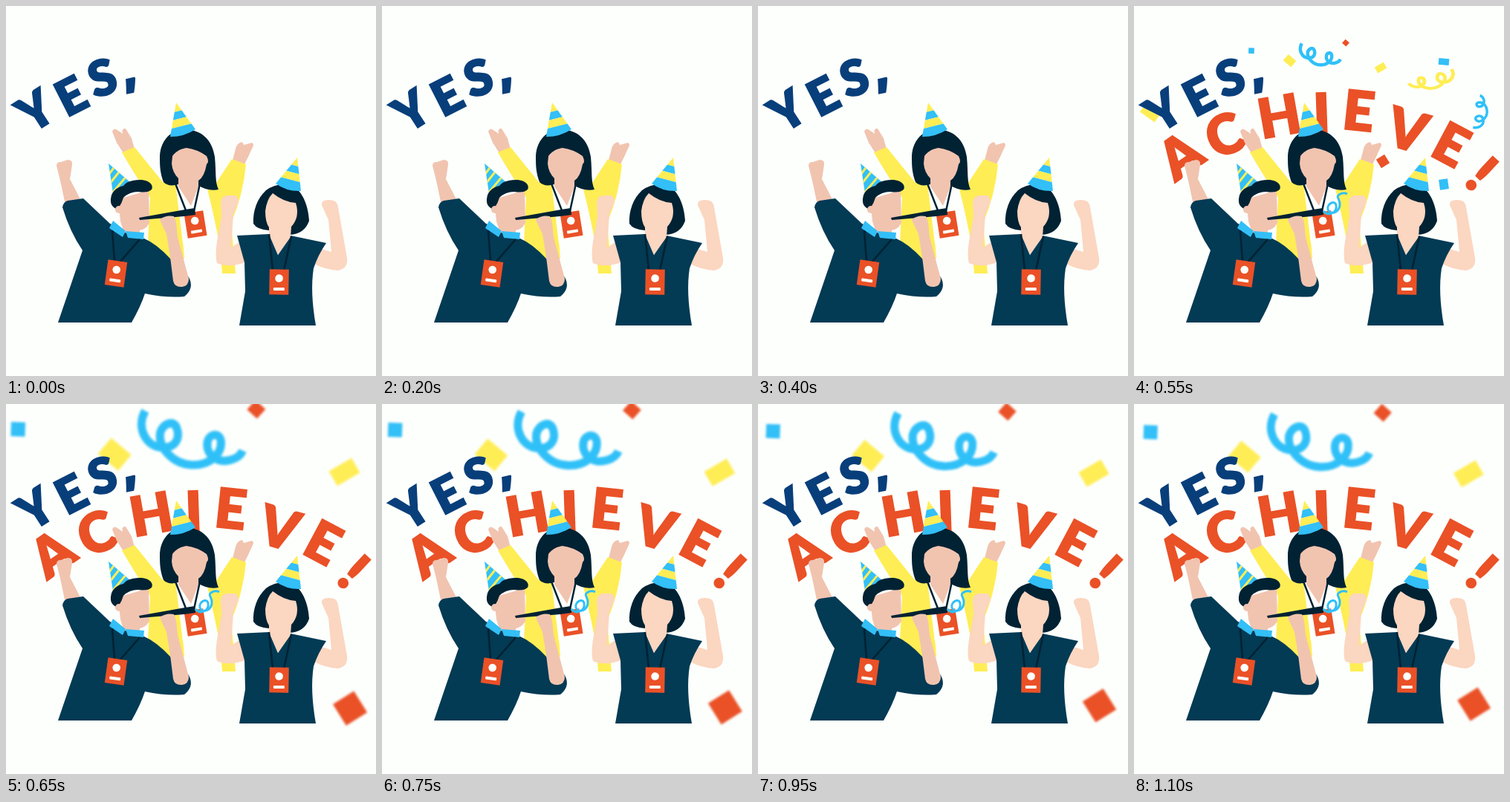
These frames come from a looping animation (498 by 498 pixels, 1150 ms). An HTML page:

```html
<!DOCTYPE html>
<html lang="en">
<head>
<meta charset="utf-8">
<title>Yes, achieve!</title>
<style>
html, body { margin: 0; width: 100%; height: 100%; overflow: hidden; background: #fdfffc; }
svg { display: block; width: 100%; height: 100%; }
text { font-family: Lato, Inter, sans-serif; font-weight: 900; text-anchor: middle; stroke-width: 1.6; }
#yes { fill: #083f7b; stroke: #083f7b; }
#yes text:last-child { font-family: "Open Sans", sans-serif; }
#achieve { stroke: #ea5127; }
.skin { fill: #f1c4b0; }
.fair { fill: #fbd6c0; }
.navy { fill: #033a54; }
.dark { fill: #002233; }
.yellow { fill: #ffed55; }
.cyan { fill: #33bff7; }
.orange { fill: #ea5127; }
.white { fill: #fdfffc; }
.cord { fill: none; stroke: #002233; stroke-width: 2.5; }
.curl { fill: none; stroke: #30c0f8; stroke-width: 11; }
.gold { stroke: #ffed55; }
</style>
</head>
<body>
<svg viewBox="0 0 498 498">
  <defs>
    <path id="curl" d="M-62-39C-75-16-60 9-40 10C-22 11-15-2-20-16C-24-28-38-22-42-10C-45 10-25 32 0 33C25 34 40 18 39 2C37-12 23-8 21 2C18 20 35 32 53 26Q64 23 68 14"/>
    <g id="badge">
      <rect class="orange" x="-13" y="-17" width="26" height="34"/>
      <circle class="white" cy="-5" r="5.3"/>
      <rect class="white" x="-7.5" y="7.5" width="15" height="4" rx="1"/>
    </g>
    <clipPath id="hatL"><path d="M138 212L144 252L168 238Z"/></clipPath>
    <clipPath id="hatM"><path d="M229 130L221 176Q240 176 255 166Z"/></clipPath>
    <clipPath id="hatR"><path d="M392 204L363 239Q378 250 397 249Z"/></clipPath>
  </defs>

  <g id="blur"><g id="confetti"></g></g>
  <g id="yes"></g>
  <g id="achieve" class="orange"></g>

  <!-- woman in yellow -->
  <path class="skin" d="M143 169Q145 163 150 167L157 172Q155 164 161 165L169 178L173 193L158 198L149 184Z"/>
  <path class="skin" d="M309 192Q311 184 318 183L320 187L331 184Q335 186 331 192L326 203L321 213L305 208Z"/>
  <path class="yellow" d="M156 197L173 190L211 237L232 240L240 340L190 340L194 258Q172 225 156 197Z"/>
  <path class="yellow" d="M304 206L323 213Q319 255 303 292L309 360H291Q288 310 270 244L283 238Z"/>
  <path class="white" d="M228 238H269Q280 285 287 320H238Z"/>
  <path class="dark" d="M236 167C259 164 277 177 281 203C283 224 281 236 286 247Q272 250 258 241L232 240Q219 244 212 237C208 226 207 218 207 205C207 182 220 169 236 167Z"/>
  <path class="skin" d="M224 202C229 195 236 192 243 191Q258 193 270 202Q274 210 270 213Q267 230 259 235V243L249 269L232 243V232Q224 224 223 212Z"/>
  <g clip-path="url(#hatM)"><g id="bandsM"></g></g>
  <path class="cord" d="M228 239L242 275M261 239L253 276"/>
  <use href="#badge" transform="translate(255 294) rotate(-9)"/>

  <!-- man with horn -->
  <g clip-path="url(#hatL)">
    <rect class="cyan" x="134" y="208" width="38" height="46"/>
    <path d="M137 229L147 215M139 240L158 216M143 252L168 222" stroke="#ffed55" stroke-width="3"/>
  </g>
  <path class="skin" d="M68 215Q68 210 74 210L83 207Q90 207 89 214L86 233L101 262L80 268L73 235Z"/>
  <path class="navy" d="M76 271Q77 264 83 262L104 259L140 293L184 312Q203 320 222 341L246 365Q254 380 240 391Q215 393 187 387Q181 405 169 426H70L103 329Q86 304 76 271Z"/>
  <path class="skin" d="M151 260L192 248L193 292Q189 300 180 302V307L159 305L154 290Z"/>
  <path class="dark" d="M141 264C140 251 148 244 158 242C163 235 173 234 183 234C194 235 199 242 196 247Q191 252 178 250Q166 250 158 258Q156 265 152 271L148 273Q142 270 141 264Z"/>
  <circle class="skin" cx="152" cy="274" r="5"/>
  <path class="cyan" d="M144 289L161 303L157 311L139 299ZM161 303L186 305L185 314L164 312Z"/>
  <path class="cord" d="M143 302L146 343M180 314L153 345"/>
  <use href="#badge" transform="translate(148 360) rotate(8)"/>
  <path class="skin" d="M207 288L212 279L226 280L229 292L231 311L246 367Q246 377 237 378Q227 379 225 370L221 338L216 307Z"/>
  <path class="dark" d="M179 285L241 274L254 272L255 281L240 283L180 288Z"/>
  <path class="skin" d="M209 286Q216 281 226 283L228 293L212 295Z"/>
  <path id="streamer" class="curl" style="stroke-width:3" d="M255 276C262 284 274 278 272 268C270 260 259 267 261 274C264 282 276 278 277 268C278 260 271 257 276 254Q281 250 287 253"/>

  <!-- woman on the right -->
  <path class="fair" d="M289 264Q290 255 299 255L309 255Q314 259 312 266L306 280L303 325L317 316L322 345Q300 353 284 346Q281 337 284 317L290 283Z"/>
  <path class="fair" d="M425 268Q424 261 434 261Q446 260 447 271L459 339Q461 353 447 356Q430 355 415 347L425 327L438 331L434 288Z"/>
  <path class="dark" d="M333 293C332 276 338 259 350 248Q365 237 385 241C400 250 407 270 408 289Q402 307 381 308L354 302Q338 301 333 293Z"/>
  <path class="navy" d="M311 309L354 307L366 335L383 309L431 319Q420 335 414 353Q409 385 417 430H314L322 384L321 345Z"/>
  <path class="fair" d="M349 276Q351 260 359 252Q374 264 390 265Q396 284 384 297L383 311L366 335L354 307V298Q349 291 349 276Z"/>
  <g clip-path="url(#hatR)"><g id="bandsR"></g></g>
  <path class="cord" d="M354 307L359 356M384 310L374 356"/>
  <use href="#badge" transform="translate(367.5 371.5) rotate(1)"/>
</svg>
<script>
const LOOP = 1150, STEP = 50, BURST = 550, CX = 251, CY = 77;
const $ = id => document.getElementById(id);

// Each glyph: character, centre x, centre y, tilt
function letters(id, size, list) {
  $(id).innerHTML = list.map(([ch, x, y, tilt]) =>
    `<text font-size="${size}" y="${size * .359}" transform="translate(${x} ${y}) rotate(${tilt})">${ch}</text>`).join('');
}

function bands(id, x, y, tilt, height) {
  const edges = [0, .27, .5, .74, 1.2];
  $(id).innerHTML = edges.slice(0, 4).map((e, i) =>
    `<rect class="${i % 2 ? 'cyan' : 'yellow'}" x="-30" y="${e * height}" width="60"
      height="${(edges[i + 1] - e) * height}" transform="translate(${x} ${y}) rotate(${tilt})"/>`).join('');
}

const square = (color, x, y, w, h, tilt) =>
  `<rect class="${color}" x="${-w / 2}" y="${-h / 2}" width="${w}" height="${h}" transform="translate(${x} ${y}) rotate(${tilt})"/>`;
const curl = (color, x, y, more) =>
  `<use href="#curl" class="curl ${color}" transform="translate(${x} ${y}) ${more}"/>`;

letters('yes', 66, [['Y', 40, 141, -33], ['E', 87.5, 121, -27], ['S', 129.5, 96.5, -17], [',', 164, 84, -12]]);
letters('achieve', 74, [
  ['A', 62, 201, -35], ['C', 121.5, 173.5, -21], ['H', 195.5, 148, -10], ['I', 252.5, 144, -2],
  ['E', 302.5, 141, 6], ['V', 368, 167, 16], ['E', 427, 186.5, 28], ['!', 468, 226, 43]
]);
bands('bandsM', 229, 130, -14, 44);
bands('bandsR', 392, 204, 15, 42);

$('confetti').innerHTML =
  square('cyan', 158, 60.2, 7.6, 7.6, 2) +
  square('yellow', 209.5, 73.6, 14, 11, 40) +
  square('orange', 285, 49.6, 7.2, 6.8, 42) +
  square('yellow', 332, 83, 14, 9, -30) +
  square('orange', 335, 209, 13.2, 13.4, -32) +
  square('cyan', 417, 75, 14, 9, 5) +
  square('cyan', 417, 240, 12, 14, -8) +
  square('yellow', 21, 145, 24, 11, 35) +
  curl('', 250.6, 66, 'scale(.4)') +
  curl('gold', 400, 99, 'scale(-.44 .36)') +
  curl('', 465, 142, 'rotate(-100) scale(.31)');

function draw(now) {
  const t = Math.floor(now % LOOP / STEP) * STEP;
  const shown = t >= BURST, flown = t > BURST;
  for (const id of ['blur', 'achieve', 'streamer'])
    $(id).style.display = shown ? '' : 'none';

  // After the burst the pieces hang close to the viewer, slowly receding and sinking
  const drift = (t - 750) / 350;
  const scale = flown ? 2.51 - .05 * drift : 1;
  const fall = flown ? 2.2 * drift : 0;
  $('blur').style.filter = flown ? 'blur(1.5px)' : 'none';
  $('confetti').setAttribute('transform',
    `translate(${CX} ${CY + fall}) scale(${scale}) translate(${-CX} ${-CY})`);
}

const start = performance.now();
function tick() {
  draw(performance.now() - start);
  requestAnimationFrame(tick);
}
tick();
</script>
</body>
</html>
```
